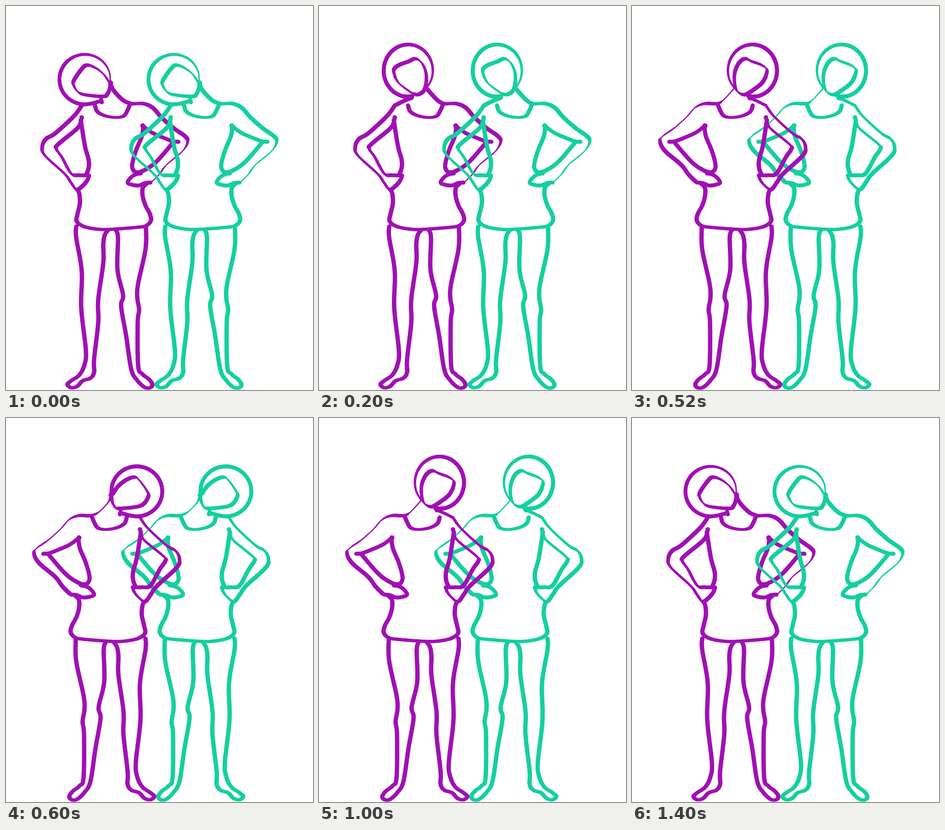
These frames come from a looping animation (669x837 px, 1.6 s). An HTML page with a canvas:

```html
<!DOCTYPE html>
<html lang="en">
<head>
<meta charset="utf-8">
<title>Two dancers</title>
<style>
html, body { margin: 0; width: 100%; height: 100%; overflow: hidden; background: #fff; }
canvas { display: block; }
</style>
</head>
<body>
<canvas id="stage" width="669" height="837"></canvas>
<script>
const ctx = document.getElementById('stage').getContext('2d');
const MIRROR = 457, GAP = 194, STEP = 200;
const ORDER = [0, 1, 2, 3, 3, 2, 1, 0];
let path, flip;

// Pens give the stroke width from the travel direction or the progress 0..1.
const nib = (thin, thick, angle) => dir => thin + (thick - thin) * Math.abs(Math.sin(dir - angle));
const taper = (a, b, c) => (dir, t) => t < .5 ? a + (b - a) * t * 2 : b + (c - b) * (t * 2 - 1);
const even = w => () => w;

const falling = Math.PI / 4, rising = -falling;
const nearPen = nib(5, 9.5, falling);
const farPen = nib(2.5, 9.5, rising);
const facePen = nib(3.5, 9.5, falling);
const flatPen = nib(7, 9.6, 0);
const roundPen = even(9.3);

const spline = (a, b, c, d, t) => b + t / 2 * (c - a +
  t * (2 * a - 5 * b + 4 * c - d + t * (3 * (b - c) + d - a)));

function dot(x, y, w) {
  path.moveTo(x + w / 2, y);
  path.arc(x, y, w / 2, 0, 7);
}

const place = ([x, y]) => [flip ? MIRROR - x : x, y];
const blob = (x, y, w) => dot(...place([x, y]), w);

// Smooth brush line through key points.
function line(pen, ...points) {
  const p = points.map(place), last = p.length - 1, trail = [];
  for (let i = 0; i < last; i++) {
    const a = p[Math.max(i - 1, 0)], b = p[i], c = p[i + 1], d = p[Math.min(i + 2, last)];
    const n = Math.ceil(Math.hypot(c[0] - b[0], c[1] - b[1]) * 1.2);
    for (let k = 0; k < n; k++) trail.push([0, 1].map(j => spline(a[j], b[j], c[j], d[j], k / n)));
  }
  trail.push(p[last]);
  let dir;
  trail.forEach(([x, y], i) => {
    const next = trail[i + 1];
    if (next) dir = Math.atan2(next[1] - y, next[0] - x);
    dot(x, y, pen(dir, i / trail.length));
  });
}

const arc = (cx, cy, rx, ry, from, to) => Array.from({ length: 15 }, (_, i) => {
  const a = from + (to - from) * i / 14;
  return [cx + rx * Math.cos(a), cy + ry * Math.sin(a)];
});

function arms() {
  line(nearPen, [165, 217], [148, 240], [108, 277], [87, 290], [79, 307], [85, 326],
    [128, 366], [141, 384], [154, 400], [168, 391], [177, 380], [181, 370]);
  line(nearPen, [181, 369], [160, 369], [142, 365], [122, 330], [110, 312], [113, 302],
    [154, 268], [163, 253], [165, 243]);
  line(flatPen, [163, 249], [172, 305], [180, 335], [180, 353], [175, 367]);
  blob(165, 243, 10);

  line(farPen, [264, 210], [275, 213], [300, 213], [320, 222], [339, 243], [365, 266],
    [389, 283], [396, 295], [385, 316], [350, 346], [334, 367], [318, 383]);
  line(even(8.5), [298, 261], [318, 276], [345, 288], [364, 295], [376, 296]);
  line(roundPen, [363, 299], [330, 337], [307, 355], [286, 363], [276, 355], [276, 340],
    [284, 313], [296, 284], [299, 263]);
  blob(298, 261, 11);
  line(even(8.5), [294, 365], [283, 367], [272, 374], [265, 385], [276, 390], [290, 391],
    [303, 386], [315, 385]);
}

function shirt() {
  line(nib(6, 9.5, 0), [194, 217], [199, 230], [215, 239], [238, 243], [256, 240], [264, 229], [270, 215]);
  line(flatPen, [306, 388], [298, 397], [298, 415], [304, 435], [313, 452], [316, 467],
    [307, 478], [290, 482], [225, 487], [195, 486], [168, 480], [154, 469], [156, 453],
    [161, 430], [160, 411], [157, 402]);
}

function legs() {
  line(flatPen, [153, 481], [153, 505], [165, 578], [164, 658], [174, 750], [171, 782],
    [160, 804], [142, 817], [134, 825], [142, 832], [155, 829], [167, 817], [184, 811],
    [192, 798], [192, 770], [201, 690], [201, 640], [212, 560], [212, 520], [215, 500], [222, 489]);
  line(flatPen, [239, 488], [244, 505], [243, 575], [255, 630], [251, 655], [262, 720],
    [273, 792], [286, 816], [302, 831], [314, 832], [319, 825], [312, 814], [297, 802],
    [288, 784], [287, 690], [290, 662], [286, 635], [288, 605], [304, 530], [305, 482]);
}

function tiltedHead() {
  const hair = flip ? even(8.8) : taper(3, 8.5, 8.5);
  line(hair, ...arc(172, 160, 55.5, 54.5, .1, -5), [204, 208], [209, 210], [207, 204]);
  line(facePen, [224, 165], [212, 148], [195, 135], [178, 129], [167, 135], [148, 162],
    [148, 174], [158, 188], [175, 194], [213, 197], [222, 190], [226, 179], [227, 167]);
  line(farPen, [228, 166], [232, 180], [243, 194], [256, 206], [266, 211]);
  blob(228, 168, 11);
  blob(212, 198, 7);
}

function raisedHead() {
  line(taper(9, 9, 4), ...arc(194.5, 141, 53.5, 57, 1.41, 7.02));
  line(farPen, [234, 179], [248, 195], [259, 206], [266, 211]);
  line(nearPen, [202, 200], [185, 207], [165, 217]);
  line(facePen, [166, 155], [163, 139], [174, 129], [195, 121], [210, 115], [223, 123],
    [232, 141], [234, 160], [231, 179], [224, 189], [210, 193], [190, 181], [174, 168], [166, 155]);
  blob(200, 201, 10);
  blob(208, 192, 8);
}

const poses = [tiltedHead, raisedHead, raisedHead, tiltedHead].map((head, i) => {
  path = new Path2D();
  flip = i > 1;
  [arms, shirt, legs, head].forEach(part => part());
  return { path, flip };
});

function dancer(shape, color, x) {
  ctx.setTransform(1, 0, 0, 1, x, 0);
  ctx.fillStyle = color;
  ctx.fill(shape);
}

// The dancer being leaned towards stays behind.
function draw({ path, flip }) {
  ctx.setTransform(1, 0, 0, 1, 0, 0);
  ctx.clearRect(0, 0, 669, 837);
  const pair = [['#a010b4', 0], ['#15cfa0', GAP]];
  if (flip) pair.reverse();
  pair.forEach(([color, x]) => dancer(path, color, x));
}

let shown = -1;
function tick() {
  const now = ORDER[Math.floor(performance.now() / STEP) % ORDER.length];
  if (now !== shown) draw(poses[shown = now]);
  requestAnimationFrame(tick);
}
tick();
</script>
</body>
</html>
```
